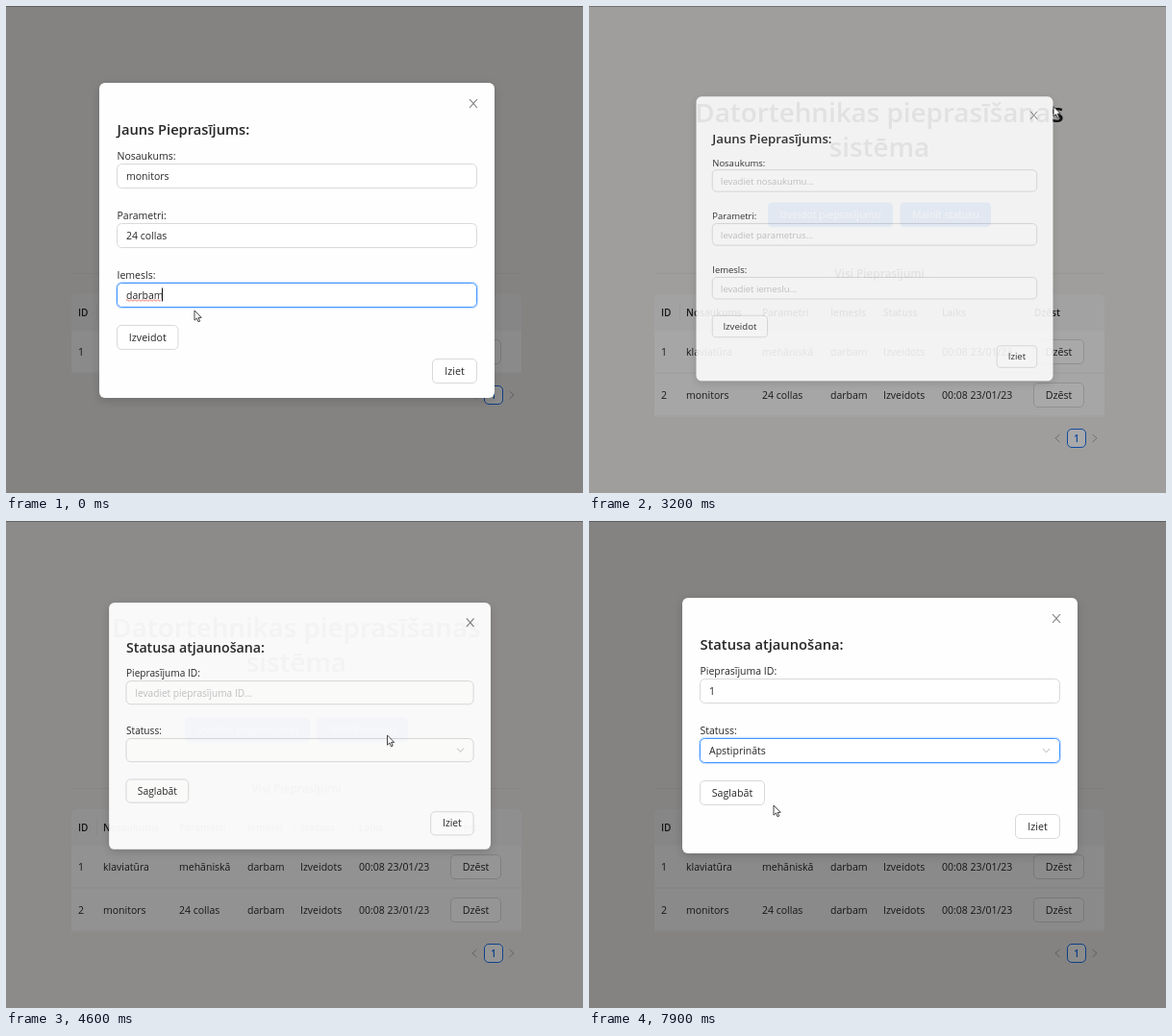
An HTML page for the animation above (8000 ms loop, 600x507 px).

```html
<!DOCTYPE html>
<html lang="lv">
<head>
<meta charset="utf-8">
<style>
  html, body { margin: 0; height: 100%; overflow: hidden; background: #f0eeec; }
  svg { display: block; width: 100vw; height: 100vh; font: 10.5px "Open Sans", "Noto Sans", sans-serif; }
  text { white-space: pre; }
</style>
</head>
<body>
<svg id="stage" viewBox="0 0 600 507"></svg>
<script>
const LOOP = 8000, STEP = 100;
const BLUE = '#1a70ec', LIGHT_BLUE = '#4096ff', INK = '#262626', LINE = '#d9d9d9';

const clamp = v => Math.max(0, Math.min(1, v));
const progress = (t, start, length) => clamp((t - start) / length);
const easeOut = p => 1 - (1 - p) ** 3;
const easeInOut = p => p < .5 ? 4 * p ** 3 : 1 - (2 - 2 * p) ** 3 / 2;
const within = (t, from, to) => t >= from && t < to;

const text = (x, y, s, attrs = '') => `<text x="${x}" y="${y}" fill="${INK}" ${attrs}>${s}</text>`;
const centered = (x, y, s, attrs = '') => text(x, y, s, `text-anchor="middle" ${attrs}`);
const box = (x, y, w, h, r, fill, stroke = 'none', attrs = '') =>
  `<rect x="${x}" y="${y}" width="${w}" height="${h}" rx="${r}" fill="${fill}" stroke="${stroke}" ${attrs}/>`;
const path = (d, stroke, attrs = '') => `<path d="${d}" fill="none" stroke="${stroke}" ${attrs}/>`;
const group = (content, attrs) => `<g ${attrs}>${content}</g>`;
const zoomAt = (x, y, sx, sy = sx) => `transform="translate(${x} ${y}) scale(${sx} ${sy}) translate(${-x} ${-y})"`;
const style = (fill, size, weight = 400) => `style="fill:${fill};font-size:${size}px;font-weight:${weight}"`;

function button(x, y, w, h, label, color = INK, border = LINE) {
  return box(x, y, w, h, 4.5, '#fff', border) + centered(x + w / 2, y + h / 2 + 3.8, label, style(color, 10.7));
}

function primaryButton(x, w, label, fill) {
  return box(x, 206, w, 26, 4.5, '#0591ff', 'none', 'opacity=".12"') +
    box(x, 204.5, w, 25.5, 4.5, fill) + centered(x + w / 2, 221, label, style('#fff', 10.5));
}

// state: '' | 'hover' | 'focus'
function field(y, label, value, placeholder = '', state = '') {
  const ring = state === 'focus' ? box(114.5, y + 3.5, 376, 27, 6, 'none', '#cfe3ff', 'stroke-width="1.4"') : '';
  return text(115.5, y, label) + ring +
    box(115.5, y + 4.5, 374, 25, 5, '#fff', state ? LIGHT_BLUE : LINE) +
    (value ? text(125, y + 21.3, value) : text(125, y + 21.3, placeholder, style('#c2c2c2', 10.5)));
}

function dialog(height, title, content) {
  return box(97, 80, 411, height, 6, '#fefefe', 'none', 'filter="url(#shadow)"') +
    path('M482 97l8 9m0-9l-8 9', '#777', 'stroke-width="1.1"') +
    text(115.5, 134, title, style(INK, 14.7, 600)) + content +
    button(443.5, 80 + height - 40.5, 46, 25, 'Iziet');
}

function tableRow(y, cells) {
  const xs = [75, 101, 180, 251, 306, 367];
  return box(68, y, 468, 44.5, 0, '#fbfafb') + path(`M68 ${y + 43.5}H536`, '#f3f2f3') +
    cells.map((cell, i) => text(xs[i], y + 26, cell)).join('') +
    button(462.5, y + 9.5, 52, 25, 'Dzēst');
}

function page(t) {
  const twoRows = t >= 2100, pagerY = twoRows ? 450 : 405;
  const headers = [[75, 'ID'], [101, 'Nosaukums'], [180, 'Parametri'], [251, 'Iemesls'],
    [306, 'Statuss'], [367, 'Laiks'], [463, 'Dzēst']];
  const hovered = within(t, 3500, 4500);
  return box(0, 0, 600, 507, 0, '#f0eeec') + box(0, 0, 600, 1, 0, '#aaa') +
    centered(302, 120.5, 'Datortehnikas pieprasīšanas', style('#1c1c1c', 27.8, 600)) +
    centered(302, 157, 'sistēma', style('#1c1c1c', 27.8, 600)) +
    primaryButton(186, 130, 'Izveidot pieprasījumu', BLUE) +
    primaryButton(323.5, 94.5, 'Mainīt statusu', hovered ? LIGHT_BLUE : BLUE) +
    path('M68 278.5H245M359 278.5H536', '#e4e3e1') +
    centered(302, 283, 'Visi Pieprasījumi', style(INK, 11.8, 600)) +
    box(68, 300, 468, 44, 6, '#f5f4f5') +
    path([94, 173, 244, 299, 360, 456].map(x => `M${x}.5 310v18`).join(''), '#eceaec') +
    headers.map(([x, s]) => text(x, 323, s, style(INK, 10.1, 600))).join('') +
    tableRow(338, [1, 'klaviatūra', 'mehāniskā', 'darbam', 'Izveidots', '00:08 23/01/23']) +
    (twoRows ? tableRow(383, [2, 'monitors', '24 collas', 'darbam', 'Izveidots', '00:08 23/01/23']) : '') +
    path(`M489.5 ${pagerY - 4}l-4.5 4 4.5 4M523.5 ${pagerY - 4}l4.5 4-4.5 4`, '#aaa') +
    box(497.5, pagerY - 9.5, 19, 19, 4.5, '#fff', BLUE) +
    centered(507, pagerY + 4, '1', style(BLUE, 10.5, 600));
}

function createDialog(t) {
  const cleared = t >= 2100, editing = t < 600;
  const hover = within(t, 500, 2500);
  const glow = cleared ? 1 - progress(t, 2300, 400) : 0;
  let content = field(160, 'Nosaukums:', cleared ? '' : 'monitors', 'Ievadiet nosaukumu...') +
    field(222, 'Parametri:', cleared ? '' : '24 collas', 'Ievadiet parametrus...') +
    field(284, 'Iemesls:', cleared ? '' : 'darbam', 'Ievadiet iemeslu...', editing ? 'focus' : '');
  if (editing) {
    content += path('M125 306.5' + 'q1-1.6 2 0t2 0'.repeat(9), '#e0564c', 'stroke-width=".8"') +
      path('M162.5 293.5v14', '#111');
  }
  content += box(114, 330.5, 66.5, 28.5, 6, 'none', '#bcd9ff', `stroke-width="3" opacity="${glow}"`) +
    button(115.5, 332.5, 63.5, 25, 'Izveidot', hover ? (cleared ? '#2c6ccb' : LIGHT_BLUE) : INK, hover ? LIGHT_BLUE : LINE);
  return dialog(328, 'Jauns Pieprasījums:', content);
}

function dropdown(t) {
  const p = easeOut(progress(t, 6550, 180)) * (1 - easeOut(progress(t, 7380, 200)));
  if (!p) return '';
  const options = ['Izveidots', 'Apstiprināts', 'Noraidīts'];
  const active = t < 6900 ? 0 : 1;
  const rows = options.map((option, i) => {
    const y = 257.7 + i * 25.4;
    return (i === active ? box(119, y, 367, 25.4, 3, '#f4f4f4') : '') + text(128, y + 16.5, option);
  }).join('');
  return group(box(115.5, 254.5, 374, 82.5, 6, '#fff', 'none', 'filter="url(#shadow)"') + rows,
    `opacity="${p}" ${zoomAt(302, 254.5, 1, .8 + .2 * p)}`);
}

function statusDialog(t) {
  const idState = within(t, 5300, 6600) ? 'focus' : within(t, 6600, 6700) ? 'hover' : '';
  const selectState = t >= 6700 ? 'focus' : t >= 6400 ? 'hover' : '';
  const caret = within(t, 5300, 6500) && (t - 5300) % 1000 < 500;
  return dialog(266, 'Statusa atjaunošana:',
    field(160, 'Pieprasījuma ID:', t >= 5800 ? '1' : '', 'Ievadiet pieprasījuma ID...', idState) +
    (caret ? path(`M${t >= 5800 ? 132.5 : 125.5} 170.5v13`, '#111') : '') +
    field(222, 'Statuss:', t >= 7400 ? 'Apstiprināts' : '', '', selectState) +
    path('M472 237l3.5 4 3.5-4', '#bbb') +
    button(115.5, 270.5, 67, 25, 'Saglabāt')) + dropdown(t);
}

function alertBox() {
  return box(124.5, -8, 354.5, 81, 4, '#fff', 'none', 'filter="url(#shadow)"') +
    text(137, 19, 'Jauns pieprasījums ir izveidots!', style(INK, 9.7)) +
    box(415.5, 35.5, 51, 25, 4, '#fff', '#1b6cdb', 'stroke-width="1.8"') +
    box(417.5, 37.5, 47, 21, 2.5, '#2273e1') +
    centered(441, 51.3, 'OK', style('#fff', 9, 600));
}

// [time, x, y] of the pointer tip
const POINTER = [[0, 196, 317], [200, 196, 317], [500, 152, 344], [700, 152, 344], [900, 237, 272],
  [1500, 440, 46], [2000, 440, 46], [2300, 330, 112], [2900, 486, 101], [3150, 486, 101],
  [3400, 395, 217], [4400, 396.5, 223], [4700, 396.5, 223], [5200, 236, 177], [6000, 236, 177],
  [6400, 240, 234], [6600, 240, 234], [7000, 214, 294], [7400, 214, 294], [7800, 192, 296], [LOOP, 192, 296]];
const HAND_TIMES = [[500, 1300], [2900, 3200], [3500, 4500], [6400, 7500]];

function pointer(t) {
  const i = POINTER.findIndex(([time]) => time > t);
  const [t0, x0, y0] = POINTER[i - 1], [t1, x1, y1] = POINTER[i];
  const p = easeInOut((t - t0) / (t1 - t0));
  const hand = HAND_TIMES.some(([from, to]) => within(t, from, to));
  const shape = hand
    ? 'M-1.3 8V.8a1.3 1.3 0 0 1 2.6 0V5l4.2.9q1.6.4 1.5 2l-.5 3.6-1 3.3h-5.6l-3.9-5.2q-.8-1.6.6-1.6z'
    : 'M0 0V10.2L2.4 8 4 11.8 5.7 11.1 4.1 7.4H7.2Z';
  return `<path d="${shape}" transform="translate(${x0 + (x1 - x0) * p} ${y0 + (y1 - y0) * p})"
    fill="#fff" stroke="#333" stroke-width=".9" stroke-linejoin="round"/>`;
}

function scene(t) {
  const closing = progress(t, 3100, 400), opening = easeOut(progress(t, 4400, 308));
  const shrink = easeInOut(progress(t, 3100, 320));
  const mask = .45 * (t < 4400 ? 1 - closing : easeOut(progress(t, 4400, 350)));
  let svg = page(t) + box(0, 0, 600, 507, 0, '#000', 'none', `opacity="${mask}"`);
  if (shrink < 1) svg += group(createDialog(t), `opacity="${1 - shrink}" ${zoomAt(246, 227, 1 - .8 * shrink)}`);
  if (opening > 0) svg += group(statusDialog(t), `opacity="${opening}" ${zoomAt(391, 226, .2 + .8 * opening)}`);
  if (within(t, 700, 2100)) svg += alertBox();
  return svg + pointer(t);
}

const DEFS = `<defs><filter id="shadow" x="-10%" y="-20%" width="120%" height="140%">
  <feDropShadow dx="0" dy="3" stdDeviation="5" flood-opacity=".16"/></filter></defs>`;
const stage = document.getElementById('stage');
let shown = -1;

function draw() {
  const t = Math.floor(performance.now() % LOOP / STEP) * STEP;
  if (t !== shown) stage.innerHTML = DEFS + scene(shown = t);
  requestAnimationFrame(draw);
}
draw();
</script>
</body>
</html>
```
